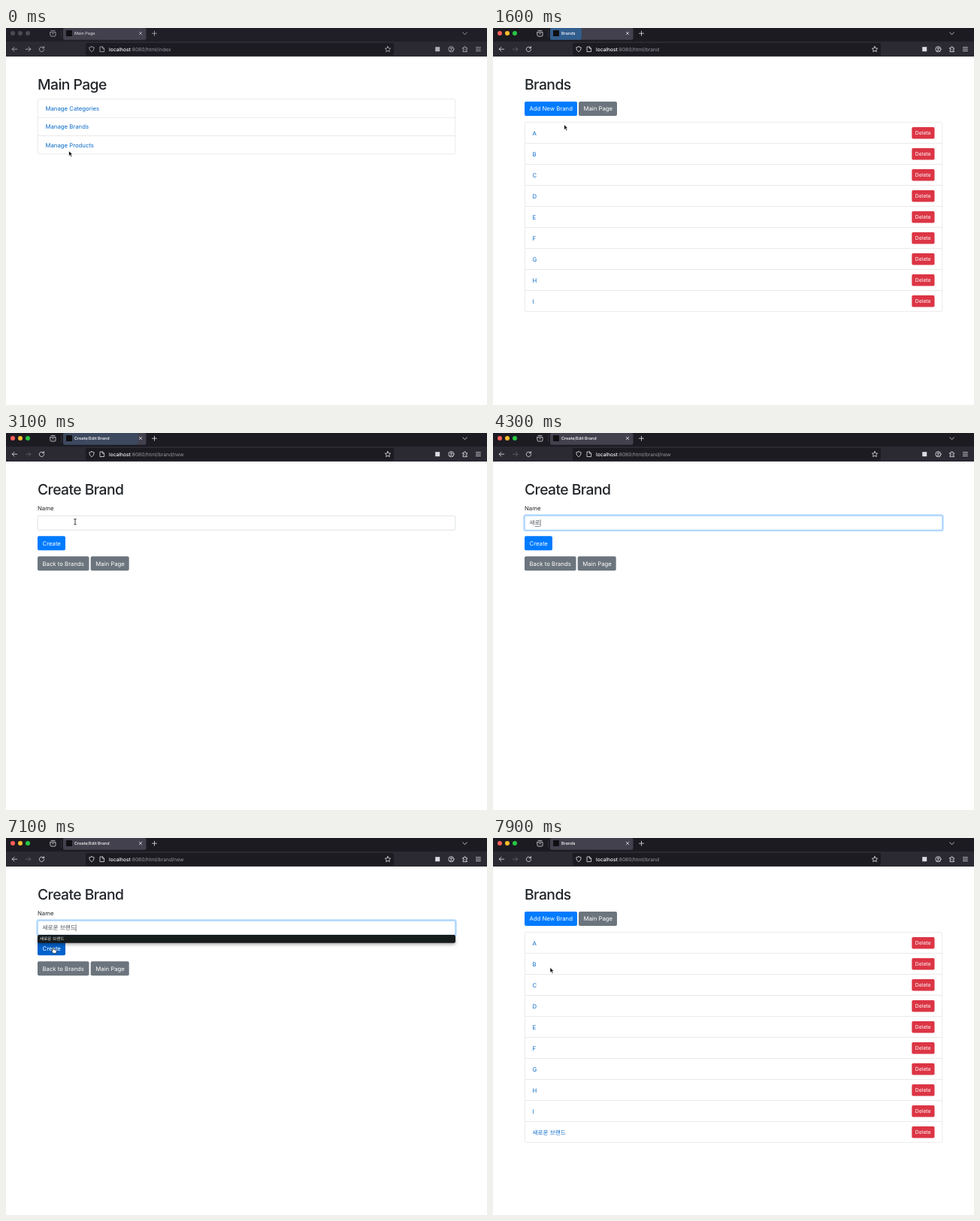
Animation of 640x502 px, one loop 8000 ms. Source, as an HTML page:

```html
<!DOCTYPE html>
<html lang="ko">
<head>
<meta charset="utf-8">
<title>Brands</title>
<style>
  html, body { margin: 0; width: 100%; height: 100%; overflow: hidden; background: #fff; }
  svg { display: block; width: 100vw; height: 100vh; }
  text { font-family: Inter, "Noto Sans CJK KR", "Noto Sans CJK", sans-serif; white-space: pre; text-rendering: geometricPrecision; }
  .line { fill: none; stroke-linecap: round; stroke-linejoin: round; stroke-width: .8; }
</style>
</head>
<body>
<svg id="stage" viewBox="0 0 640 502" preserveAspectRatio="none"></svg>
<script>
const LOOP = 8000;
const LINK = '#0a6ac8', BLUE = '#007bff', GREY = '#6c757d', RED = '#dc3545';
const $ = id => document.getElementById(id);

// Markup helpers
const rect = (x, y, w, h, fill, r = 0, more = '') =>
  `<rect x="${x}" y="${y}" width="${w}" height="${h}" rx="${r}" fill="${fill}" ${more}/>`;
const text = (x, y, s, size = 7.75, fill = '#212529', more = '') =>
  `<text x="${x}" y="${y}" font-size="${size}" fill="${fill}" ${more}>${s}</text>`;
const path = (d, more = '') => `<path class="line" d="${d}" ${more}/>`;
const group = (id, body, more = '') => `<g id="${id}" ${more}>${body}</g>`;
const heading = s => text(42, 82, s, 19.3, '#212529', 'font-weight="500" letter-spacing="-.55"');
const button = (x, y, w, s, fill, id = '') =>
  rect(x, y, w, 19, fill, 2, id && `id="${id}"`) + text(x + 6.5, y + 12.4, s, 7.75, '#fff');
const frame = (y, h, id = '') =>
  rect(42.25, y, 555.5, h, 'none', 2, `stroke="#dcdcdc" stroke-width=".6" ${id && `id="${id}"`}`);
const rule = y => rect(42.5, y, 555, .6, '#dcdcdc');

function mainPage() {
  const items = ['Categories', 'Brands', 'Products'];
  return heading('Main Page') + frame(94.6, 73.2) + items.map((s, i) =>
    (i ? rule(94.5 + 24.4 * i) : '') +
    text(52.5, 109.7 + 24.4 * i, 'Manage ' + s, 7.75, LINK, i === 1 ? 'id="brandLink"' : '')).join('');
}

function brandRow(name, i) {
  const y = 125.5 + 28 * i;
  return (i ? rule(y - .3) : '') +
    text(52.5, y + 17, name, i < 9 ? 7.75 : 7.66, LINK) +
    rect(557.3, y + 6.5, 30.2, 15.4, RED, 1.7) +
    text(561.8, y + 16.7, 'Delete', 6.85, '#fff');
}

function brandsPage() {
  return heading('Brands') +
    button(42, 98, 70, 'Add New Brand', BLUE, 'addBtn') + button(114, 98, 51, 'Main Page', GREY) +
    frame(125.4, 252, 'listFrame') + [...'ABCDEFGHI'].map(brandRow).join('') +
    group('newRow', brandRow('새로운 브랜드', 9));
}

function createPage() {
  return heading('Create Brand') + text(42, 103, 'Name') +
    rect(41.2, 109.2, 557.6, 21, 'none', 2.6, 'id="ring" stroke="#b9dbff" stroke-width="1.8"') +
    rect(42.2, 110.2, 555.6, 19, '#fff', 2, 'id="field" stroke="#ced4da" stroke-width=".7"') +
    text(48.5, 122.4, '', 7.66, '#495057', 'id="typed"') +
    rect(0, 124.1, 7, .6, '#495057', 0, 'id="mark"') +
    rect(0, 115.2, .6, 9, '#212529', 0, 'id="caret"') +
    button(42, 137.2, 37, 'Create', BLUE, 'createBtn') +
    button(42, 164.2, 68.5, 'Back to Brands', GREY) + button(112.7, 164.2, 51, 'Main Page', GREY) +
    group('suggest', rect(42, 129, 556, 10.8, '#191a1e', 2, 'filter="url(#shade)"') +
      text(45, 136.4, '새로운 브랜드', 5.6, '#f5f5f7'));
}

function chrome() {
  const lights = [9, 19, 29].map((x, i) => `<circle id="light${i}" cx="${x}" cy="7" r="3"/>`).join('');
  const icons =
    path('M59 5.5h7v4.3q0 1.2-1.2 1.2h-4.6q-1.2 0-1.2-1.2zM60 3.4h5M61.6 7.6h1.8') +
    path('M177.2 5.2l3.6 3.6M180.8 5.2l-3.6 3.6M194.5 7.2h6M197.5 4.2v6') +
    path('M607.8 6l2.8 2.6 2.8-2.6') +
    path('M14.7 28.2H8.2M11 25.4l-2.8 2.8 2.8 2.8') +
    path('M50 26.3A3.2 3.2 0 1 0 50.7 28.6M50.6 24.6v2.2h-2.2') +
    path('M114 24.8q1.6 1 3.2 1 .2 4.4-3.2 6-3.4-1.6-3.2-6 1.6 0 3.2-1z') +
    path('M125.4 25h3l2.2 2.2v4.3h-5.2zM128.4 25v2.2h2.2') +
    path('M508 24.5l1.1 2.4 2.6.3-1.9 1.8.5 2.6-2.3-1.3-2.3 1.3.5-2.6-1.9-1.8 2.6-.3z') +
    rect(571.2, 25.2, 6, 6, '#dcdbe2', 0, 'stroke="none"') +
    '<circle class="line" cx="592.4" cy="28.2" r="3.6"/><circle class="line" cx="592.4" cy="27.2" r="1.2"/>' +
    path('M590.3 30.6q2.1-2.2 4.2 0') +
    path('M608 26.4h1.6q-.3-1.8 1-1.8t1 1.8h1.8v1.9q-1.6-.3-1.6 1t1.6 1v1.3H608v-1.8q1.6.2 1.6-1t-1.6-1z') +
    path('M625.4 25.8h6M625.4 28.2h6M625.4 30.6h6');
  return rect(0, 0, 640, 18.5, '#1c1b22', 0, 'id="strip"') + rect(0, 18, 640, 20, '#2b2a33') +
    rect(106, 20, 410, 16.5, '#1c1b22', 2) + rect(73, 3, .5, 10, '#45444e') +
    rect(76, 0, 110.5, 15.8, '#42414d', 2) +
    '<g clip-path="url(#tab)"><circle id="burst" cx="84" cy="7" fill="#2677c4"/></g>' +
    rect(80, 3, 8, 8, '#101014', .5, 'id="favicon"') + '<circle id="dot" cy="7" r=".9" fill="#c9c8d2"/>' +
    group('inks', icons + text(91, 9.2, '', 5.5, '#fbfbfe', 'id="tabTitle" stroke="none" font-weight="500"'),
      'stroke="#e6e5ec" fill="none"') +
    path('M26.3 28.2h6.5M30 25.4l2.8 2.8-2.8 2.8', 'id="forward" stroke="#e6e5ec"') + lights +
    '<text x="137" y="30.6" font-size="6.65" fill="#9b9aa5"><tspan fill="#fbfbfe" font-weight="500">localhost</tspan><tspan id="route"></tspan></text>';
}

function pointers() {
  const ink = 'stroke-linejoin="round" stroke="#fff" stroke-width=".6"';
  return group('pointer',
    `<path id="arrow" d="M0 0v6.9l1.6-1.5 1.2 2.7 1.2-.5-1.2-2.7h2.1z" fill="#000" ${ink}/>` +
    '<path id="hand" d="M-.8.2q.8-1 1.5 0v2.7l3.2.8q.8.3.6 1.4l-.7 2.9H0L-2 5.2q-.5-1.1.5-1l.7.6z" fill="#fff" stroke="#111" stroke-width=".6" stroke-linejoin="round"/>' +
    '<path id="beam" class="line" d="M-1.3-3.6q1.3 0 1.3 1 0-1 1.3-1M0-2.6v5.6M-1.3 4q1.3 0 1.3-1 0 1 1.3 1" stroke="#111"/>');
}

$('stage').innerHTML =
  `<defs><clipPath id="tab">${rect(76, 0, 110.5, 15.8, '#fff', 2)}</clipPath>
   <filter id="shade" x="-5%" y="-100%" width="110%" height="400%"><feDropShadow dx="0" dy="2" stdDeviation="2" flood-opacity=".35"/></filter></defs>` +
  rect(0, 0, 640, 502, '#fff') + group('main', mainPage()) + group('brands', brandsPage()) +
  group('create', createPage()) + chrome() + pointers();

// Timing
const ACTIVE = 500, FOCUS = 3200, TYPED = 4720, COMMIT = 6650;
const views = [
  { at: 0, id: 'main', title: 'Main Page', route: 'index' },
  { at: 1200, id: 'brands', title: 'Brands', route: 'brand' },
  { at: 2600, id: 'create', title: 'Create/Edit Brand', route: 'brand/new' },
  { at: 7350, id: 'brands', title: 'Brands', route: 'brand' }
];
const loads = [[1000, 1500], [2300, 2800], [7150, 7480]];
const track = [
  [100, 83.7, 163.7], [500, 95, 130.5], [1200, 95, 130.5], [1400, 94.7, 128.7], [1850, 94.7, 128.7],
  [2200, 94, 111.3], [2750, 94, 111.3], [3100, 92, 118], [5850, 92, 118], [6080, 89.5, 109],
  [6150, 89.5, 109], [6500, 62.8, 145.6], [7480, 62.8, 145.6], [7880, 76, 172.4]
];
const keys = 'ㅅ,새,샐,새로,새롱,새로우,새로운,새로운 ,새로운 ㅂ,새로운 브,새로운 블,새로운 브래,새로운 브랜,새로운 브랜ㄷ,새로운 브랜드'.split(',');

const clamp = v => Math.max(0, Math.min(1, v));
const show = (id, on) => $(id).setAttribute('visibility', on ? 'inherit' : 'hidden');
const set = (id, attrs) => { for (const k in attrs) $(id).setAttribute(k, attrs[k]); };
const between = (t, a, b) => t >= a && t < b;
const blend = (a, b, p) => `rgb(${a.map((v, i) => Math.round(v + (b[i] - v) * p))})`;
const hover = p => blend([0, 123, 255], [0, 98, 204], p);

function pointerAt(t) {
  let i = track.findIndex(k => k[0] > t);
  if (i < 0) i = track.length;
  const a = track[Math.max(0, i - 1)], b = track[Math.min(i, track.length - 1)];
  let p = b[0] > a[0] ? clamp((t - a[0]) / (b[0] - a[0])) : 0;
  p = p * p * (3 - 2 * p);
  return [a[1] + (b[1] - a[1]) * p, a[2] + (b[2] - a[2]) * p];
}

function typedAt(t) {
  if (t < 3600) return '';
  const n = t < 4340 ? (t >= 3700) + (t >= 3900) + (t >= 4050) : 3 + Math.floor((t - 4340) / 34);
  return keys[Math.min(n, keys.length - 1)];
}

function drawChrome(t, view) {
  const on = t >= ACTIVE;
  ['#ff5f57', '#febc2e', '#28c840'].forEach((c, i) => set('light' + i, { fill: on ? c : '#4b4a54' }));
  set('strip', { fill: on ? '#1c1b22' : '#201f27' });
  set('inks', { opacity: on ? 1 : .75 });
  set('forward', { opacity: view.id === 'main' ? .8 : .3 });
  $('tabTitle').textContent = view.title;
  $('route').textContent = ':8080/html/' + view.route;

  const load = loads.find(l => between(t, ...l));
  show('favicon', !load);
  show('dot', load);
  if (load) set('dot', { cx: 84 - 3.2 * Math.cos((t - load[0]) / 160) });
  const done = loads.find(l => between(t, l[1], l[1] + 375));
  show('burst', done);
  if (done) {
    const p = (t - done[1]) / 375;
    set('burst', { r: 5 + 108 * p, opacity: .75 * (1 - p) });
  }
}

function drawForm(t) {
  const p = clamp((t - FOCUS) / 150), s = typedAt(t), last = s.slice(-1);
  const em = 7.66, advance = c => em * (c === ' ' ? .224 : .92);
  const end = 48.5 + [...s].reduce((w, c) => w + advance(c), 0);
  set('ring', { opacity: p });
  set('field', { stroke: blend([206, 212, 218], [128, 189, 255], p) });
  $('typed').textContent = s;
  show('mark', s && last !== ' ' && t < COMMIT);
  set('mark', { x: end - 7 });
  const ref = t >= COMMIT ? COMMIT : FOCUS;
  show('caret', t >= FOCUS && (between(t, 3600, TYPED + 567) ||
    ((t < 3600 || t >= COMMIT) && (t - ref) % 1134 < 567)));
  set('caret', { x: end + .2 });
  set('createBtn', { fill: hover(clamp((t - 6400) / 150)) });
  show('suggest', t >= COMMIT);
}

function drawPointer(t) {
  const [x, y] = pointerAt(t);
  set('pointer', { transform: `translate(${x.toFixed(2)} ${y.toFixed(2)})` });
  show('pointer', !between(t, 3600, 5880));
  const hand = between(t, 400, 1200) || between(t, 2060, 2300) || between(t, 6380, 7350);
  const beam = between(t, 2600, 3600) || between(t, 5880, 6040);
  show('hand', hand);
  show('beam', beam);
  show('arrow', !hand && !beam);
}

function render(t) {
  const view = views.filter(v => v.at <= t).pop();
  ['main', 'brands', 'create'].forEach(id => set(id, { display: id === view.id ? 'inline' : 'none' }));
  const added = t >= views[3].at;
  show('newRow', added);
  set('listFrame', { height: added ? 280 : 252 });
  const over = between(t, 400, 1200);
  set('brandLink', { fill: over ? '#0056b3' : LINK, 'text-decoration': over ? 'underline' : 'none' });
  set('addBtn', { fill: hover(t < 2600 ? clamp((t - 2060) / 150) : 0) });
  drawForm(t);
  drawChrome(t, view);
  drawPointer(t);
}

const start = performance.now();
function tick() {
  render((performance.now() - start) % LOOP);
  requestAnimationFrame(tick);
}
tick();
</script>
</body>
</html>
```
